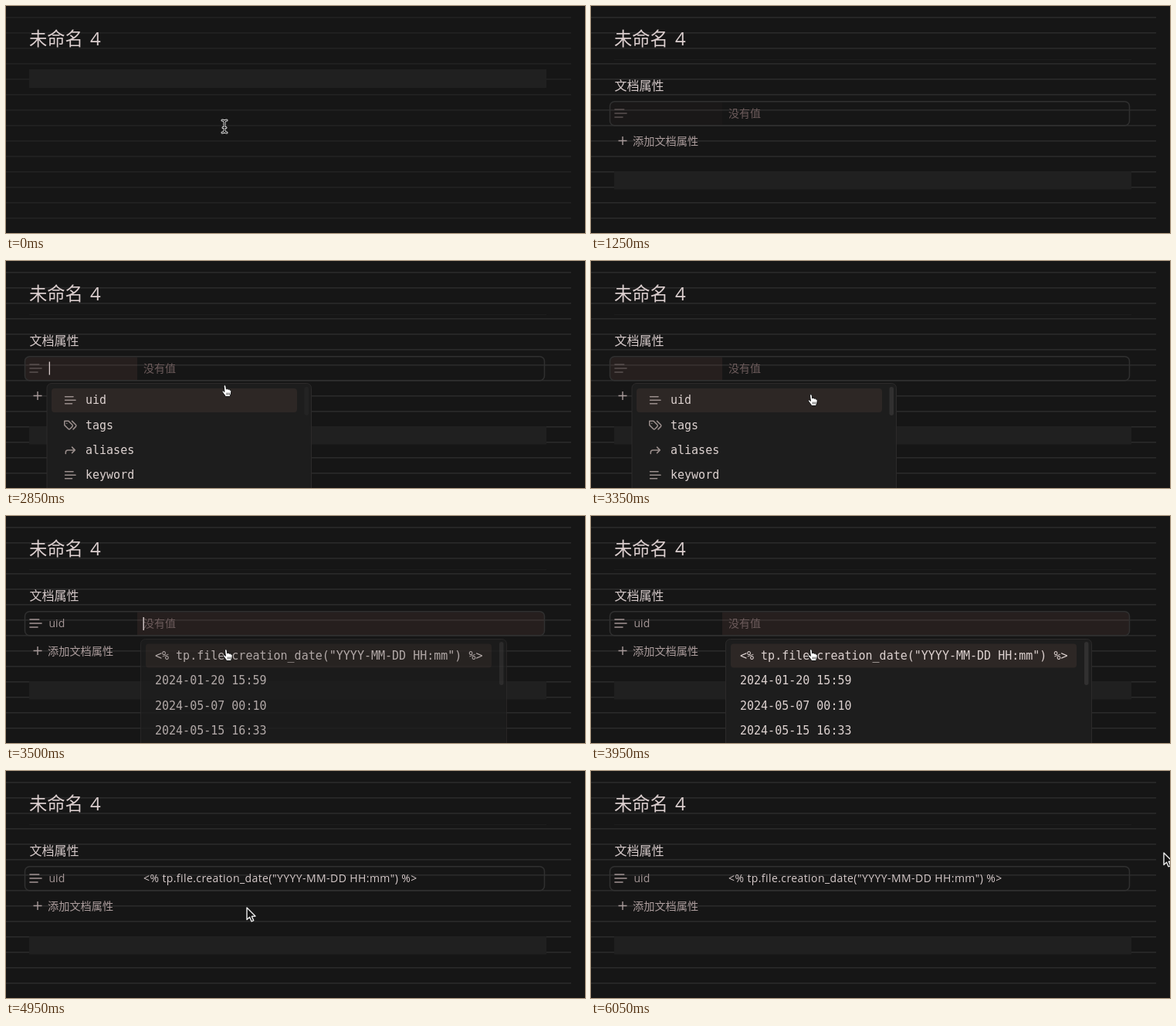
Recreate the animation shown at these times as an HTML page. Size 750x294 px, loop 7.5 s.

```html
<!DOCTYPE html>
<html lang="zh-CN">
<head>
<meta charset="utf-8">
<style>
html, body { margin: 0; width: 100%; height: 100%; overflow: hidden; background: #161616; }
svg { display: block; }
text { font: 14px "Open Sans", "Noto Sans CJK SC", "Noto Sans CJK", sans-serif; white-space: pre; fill: #d6caca; }
.cjk { font-family: "Noto Sans CJK SC", "Noto Sans CJK", sans-serif; }
.mono { font: 15px "DejaVu Sans Mono", monospace; fill: #ddd2d0; }
.icon { fill: none; stroke-width: 2; stroke-linecap: round; stroke-linejoin: round; }
.menu { fill: #1d1d1d; stroke: #2c2a2a; }
.hot { fill: #2d2725; }
.bar { fill: #313030; }
.caret { fill: #d8cccc; }
.cell { fill: rgba(125, 80, 75, .16); }
</style>
</head>
<body>
<svg width="750" height="294" viewBox="0 0 750 294">
  <defs>
    <g id="lines" class="icon"><path d="M17 6H3M21 12H3M15 18H3"/></g>
    <g id="tags" class="icon"><path d="M9 5H2v7l6.3 6.3c.9.9 2.5.9 3.4 0l3.6-3.6c.9-.9.9-2.5 0-3.4ZM6 9v.01M15 5l6.3 6.3a2.4 2.4 0 0 1 0 3.4L17 19"/></g>
    <g id="forward" class="icon"><path d="M15 17l5-5-5-5M4 18v-2a4 4 0 0 1 4-4h12"/></g>
  </defs>

  <g id="rules"></g>
  <rect id="block" x="30" width="670" fill="#202020"/>

  <text class="cjk" x="30" y="51" style="font-size:23.3px;font-weight:500;fill:#dccfcf">未命名</text>
  <text x="109" y="51" style="font-size:24px;fill:#dccfcf">4</text>

  <text id="dashes" class="mono" x="34" y="101" style="font-size:20px;letter-spacing:2px"></text>
  <rect id="typeCaret" class="caret" y="85" width="1.5" height="19"/>

  <g id="props">
    <path d="M30 69.5H700" stroke="#1d1d1d"/>
    <text class="cjk" x="30.5" y="109" style="font-size:16px">文档属性</text>
    <path id="keyCell" class="cell" d="M170 124.500H30a5 5 0 0 0-5 5v20a5 5 0 0 0 5 5H170Z"/>
    <path id="valueCell" class="cell" d="M170 124.500H692a5 5 0 0 1 5 5v20a5 5 0 0 1-5 5H170Z"/>
    <rect x="24.500" y="123.700" width="673" height="31" rx="6" fill="none" stroke="#303030" stroke-width="1.500"/>
    <svg id="rowIcon" x="28.500" y="129" width="20" height="20" viewBox="0 0 24 24"><use href="#lines"/></svg>
    <text id="key" x="55.500" y="144" style="fill:#a49696">uid</text>
    <text id="empty" class="cjk" x="178" y="144" style="fill:#6d5c5c">没有值</text>
    <text id="value" x="178" y="144" style="letter-spacing:.41px"></text>
    <path d="M35.500 174.500h11M41 169v11" stroke="#a89a9a" stroke-width="1.400"/>
    <text class="cjk" x="54" y="179.500" style="font-size:14.200px;fill:#ab9c9c">添加文档属性</text>
  </g>

  <g id="keyMenu">
    <rect class="menu" x="53" y="158.500" width="342.500" height="160" rx="6"/>
    <rect class="hot" x="59" y="165" width="318" height="31" rx="4"/>
    <rect id="keyBar" class="bar" x="386.500" y="163" width="5.500" height="37" rx="2.700"/>
  </g>
  <g id="valueMenu">
    <rect class="menu" x="174.500" y="159.500" width="474" height="160" rx="6"/>
    <rect class="hot" x="181" y="165.500" width="448" height="31" rx="4"/>
    <rect class="bar" x="639" y="163" width="5.500" height="56" rx="2.700"/>
  </g>
  <rect id="keyCaret" class="caret" x="55.700" y="130.500" width="1.300" height="17"/>
  <rect id="valueCaret" class="caret" x="177.500" y="131" width="1.400" height="17"/>

  <g id="ibeam" fill="none" stroke-linecap="round">
    <path id="beamShape" d="M-3-8Q0-8 0-5.500Q0-8 3-8M0-5.500V5.500M-3 8Q0 8 0 5.500Q0 8 3 8M-2 1.500H2" stroke="#e4e4e4" stroke-width="3"/>
    <path d="M-3-8Q0-8 0-5.500Q0-8 3-8M0-5.500V5.500M-3 8Q0 8 0 5.500Q0 8 3 8M-2 1.500H2" stroke="#111" stroke-width="1.200"/>
  </g>
  <g id="hand" stroke="#111" stroke-linejoin="round">
    <path fill="#fff" d="M2.500 2C2.500.2 5 .2 5.200 2L5.800 6C6.500 5 8 5.300 8.200 6.400C9 5.600 10.300 6 10.400 7.200C11.400 6.800 12.300 7.600 12.200 8.800C12.200 12 11 13 10.600 15.500H4.600C4 13 1.500 11.500.6 9.200C.2 8 1.800 7.400 2.600 8.600L3.400 9.400Z"/>
    <path d="M6.200 10.500v3M8 10.500v3M9.800 10.500v3" stroke-width=".7"/>
  </g>
  <path id="arrow" d="M0 0V15.500L3.600 12.200L6 17.800L8.700 16.600L6.300 11.300L11 11Z" fill="#121212" stroke="#ececec" stroke-width="1.400" stroke-linejoin="round"/>
</svg>
<script>
const LOOP = 7500, STEP = 50;
const NS = "http://www.w3.org/2000/svg";
const $ = id => document.getElementById(id);
const expression = '<% tp.file.creation_date("YYYY-MM-DD HH:mm") %>';

function add(parent, tag, attrs, text) {
  const el = document.createElementNS(NS, tag);
  for (const k in attrs) el.setAttribute(k, attrs[k]);
  if (text) el.textContent = text;
  parent.appendChild(el);
  return el;
}

for (let y = 14; y < 294; y += 20)
  add($("rules"), "rect", { x: 0, y, width: 732, height: 1.6, fill: "#2a2a2a" });

[["lines", "uid"], ["tags", "tags"], ["forward", "aliases"], ["lines", "keyword"]].forEach(([icon, name], i) => {
  const y = 180.3 + i * 32.3;
  const box = add($("keyMenu"), "svg", { x: 74.3, y: y - 9, width: 18, height: 18, viewBox: "0 0 24 24", stroke: "#9a8e8c" });
  add(box, "use", { href: "#" + icon });
  add($("keyMenu"), "text", { class: "mono", x: 103, y: y + 5 }, name);
});

[expression, "2024-01-20 15:59", "2024-05-07 00:10", "2024-05-15 16:33"].forEach((label, i) =>
  add($("valueMenu"), "text", { class: "mono", x: 193, y: 186 + i * 32.3 }, label));

$("value").textContent = expression;

const ramp = (t, a, b) => Math.min(1, Math.max(0, (t - a) / (b - a)));
const ease = p => p * p * (3 - 2 * p);
const within = (t, a, b) => t >= a && t < b;
const fade = (id, o) => { $(id).style.opacity = o; };
const show = (id, on) => fade(id, on ? 1 : 0);

// time, x, y of the pointer tip
const path = [[0, 283, 156], [2650, 283, 156], [3200, 285, 173], [4150, 285, 173],
  [4450, 315, 179], [4750, 315, 179], [4900, 312, 177], [5300, 312, 177], [6050, 742, 106]];

function pointer(t) {
  let i = 0;
  while (i < path.length - 2 && t >= path[i + 1][0]) i++;
  const [t0, x0, y0] = path[i], [t1, x1, y1] = path[i + 1];
  const p = ease(ramp(t, t0, t1));
  return [x0 + (x1 - x0) * p, y0 + (y1 - y0) * p];
}

function draw(t) {
  const open = t >= 1250, picked = t >= 3400, done = t >= 4750;

  fade("rules", .62 + .38 * ramp(t, 250, 700));
  $("block").setAttribute("y", open ? 214 : 82);
  $("block").setAttribute("height", open ? 23.5 : 24);

  const typed = [300, 550, 850].filter(s => t >= s).length;
  $("dashes").textContent = open ? "" : "-".repeat(typed);
  $("typeCaret").setAttribute("x", 32 + typed * 14);
  show("typeCaret", within(t, 250, 1250));

  show("props", open);
  fade("keyCell", picked ? 0 : ramp(t, 1200, 1400));
  fade("valueCell", picked ? 1 - ramp(t, 4700, 4900) : 0);
  $("rowIcon").setAttribute("stroke", picked ? "#a29494" : "#5a5050");
  show("key", picked);
  show("empty", !done);
  show("value", done);

  fade("keyMenu", picked ? 0 : ramp(t, 1300, 1500));
  fade("keyBar", ramp(t, 2800, 2950));
  fade("valueMenu", done || t < 3450 ? 0 : .78 + .22 * ramp(t, 3500, 3650));
  show("keyCaret", within(t, 1450, 1950) || within(t, 2450, 2950));
  show("valueCaret", within(t, 3450, 3950) || within(t, 4450, 4750));

  const [x, y] = pointer(t);
  const kind = t < 50 || within(t, 2650, 2800) ? "ibeam" : t < 2800 ? "" : t < 4850 ? "hand" : "arrow";
  for (const id of ["ibeam", "hand", "arrow"]) show(id, id === kind);
  $("ibeam").setAttribute("transform", `translate(${x} ${y})`);
  $("hand").setAttribute("transform", `translate(${x - 4} ${y - 1})`);
  $("arrow").setAttribute("transform", `translate(${x} ${y})`);
}

const start = performance.now();
function tick() {
  const t = (performance.now() - start) % LOOP;
  draw(Math.floor(t / STEP) * STEP);
  requestAnimationFrame(tick);
}
tick();
</script>
</body>
</html>
```
